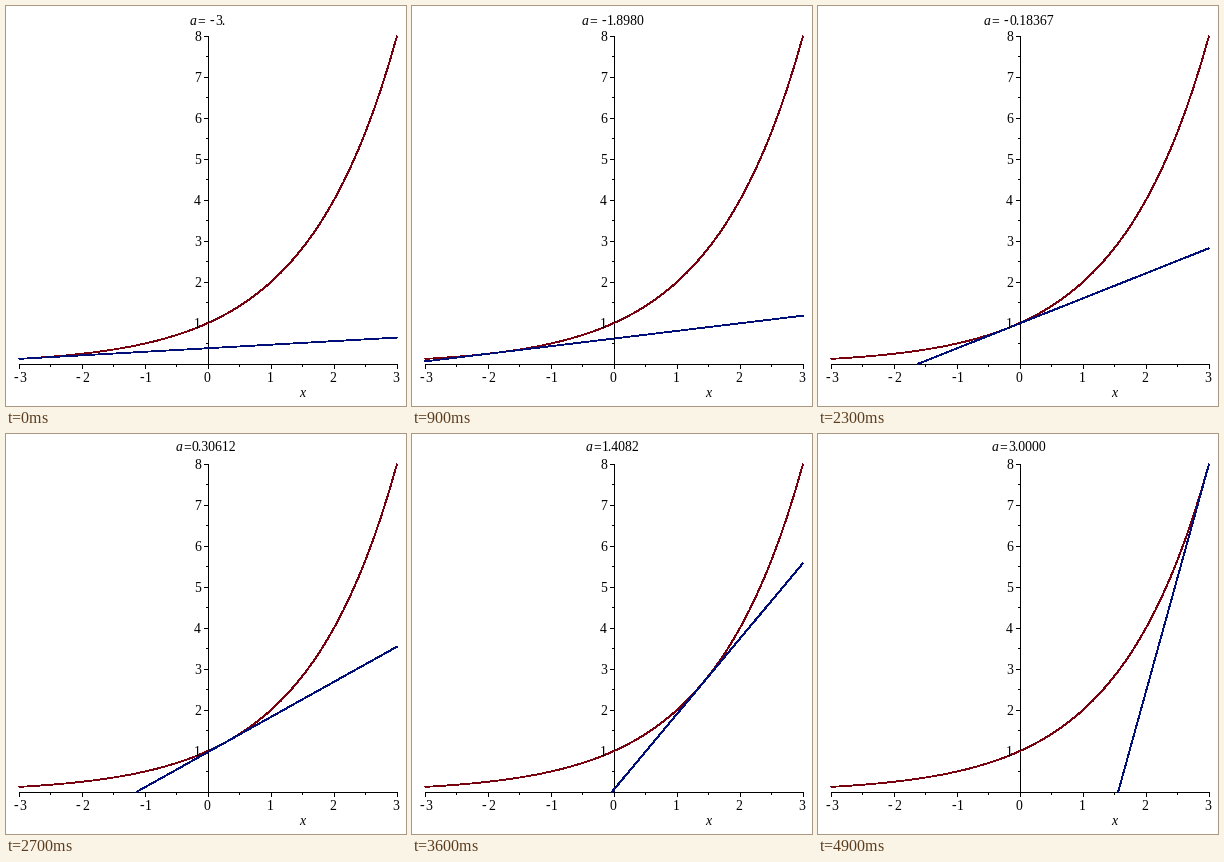
A matplotlib script for the animation above (5 s loop, 400 by 400 pixels).

```python
import math

import matplotlib.pyplot as plt
import numpy as np
from matplotlib.animation import FuncAnimation

SIZE, DPI = 400, 100
FRAMES, INTERVAL = 50, 100
RED, BLUE = "#78000e", "#000e78"
PT = 72 / DPI

plt.rcParams["font.family"] = "Liberation Serif"

fig = plt.figure(figsize=(SIZE / DPI, SIZE / DPI), dpi=DPI, facecolor="white")
ax = fig.add_axes([0, 0, 1, 1])
ax.set(xlim=(0, SIZE), ylim=(SIZE, 0))
ax.axis("off")


def px(x):
    return 202 + 63 * x


def py(y):
    return 358 - 41 * y


def stroke(xs, ys, color="black"):
    # Without antialiasing every touched pixel is filled, so stay below 1 px.
    return ax.plot(xs, ys, color=color, lw=0.8 * PT, antialiased=False,
                   snap=False, solid_capstyle="butt")[0]


def label(x, baseline, text, **style):
    return ax.text(x, baseline, text, fontsize=13.75 * PT, va="baseline", **style)


def draw_axes():
    stroke([13, 392], [358.5, 358.5])
    stroke([202.5, 202.5], [30, 359])
    for half in range(-6, 7):
        x = math.floor(px(half / 2)) + 0.5
        stroke([x, x], [358, 361 if half % 2 else 363])
    for half in range(1, 17):
        y = math.floor(py(half / 2)) + 0.5
        stroke([200 if half % 2 else 198, 203], [y, y])
    for n in range(-3, 4):
        label(px(n) + (3.5 if n < 0 else -1), 376, str(abs(n)), ha="center")
        if n < 0:
            label(px(n) - 6, 376, "-")
    for n in range(1, 9):
        label(195, py(n) + 5, str(n), ha="right")
    label(293.5, 391, "x", style="italic")


draw_axes()
xs = np.linspace(-3, 3, 50)
stroke(px(xs), py(2 ** xs), RED)
tangent = stroke([], [], BLUE)
name = label(0, 0, "a", style="italic")
equals = label(0, 0, "=")
minus = label(0, 0, "-")
value = label(0, 0, "")


def update(i):
    a = -3 + 6 * i / (FRAMES - 1)
    height, slope = 2 ** a, 2 ** a * math.log(2)
    start = max(-3, a - height / slope)
    ends = np.array([start, 3])
    tangent.set_data(px(ends), py(height + slope * (ends - a)))

    digits = f"{abs(a):#.5g}" if i else "3."
    offset, baseline = (25, 19) if a < 0 else (16, 17)
    width = offset + 7 * (len(digits) - 1) + 3
    left = round(201 - width / 2)
    for part, shift in ((name, 0), (equals, 7), (minus, 20), (value, offset)):
        part.set_position((left + shift, baseline))
    minus.set_visible(a < 0)
    value.set_text(digits)
    return tangent, name, equals, minus, value


anim = FuncAnimation(fig, update, frames=FRAMES, interval=INTERVAL,
                     repeat=True, repeat_delay=0)
plt.show()
```
